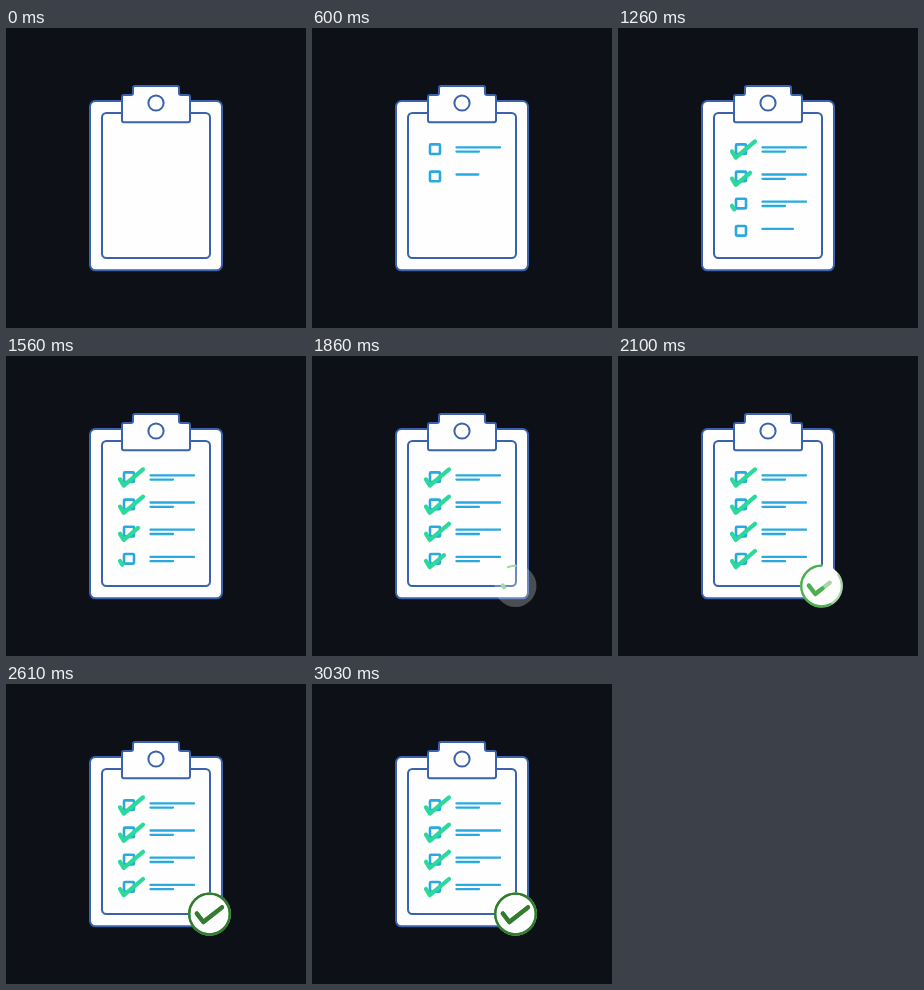
These frames come from a looping animation (300 by 300 pixels, 3060 ms). An HTML page:

```html
<!DOCTYPE html>
<html lang="en">
<head>
<meta charset="utf-8">
<title>Checklist</title>
<style>
  html, body { margin: 0; width: 100%; height: 100%; overflow: hidden; background: #0d1117; }
  svg { display: block; width: 100%; height: 100%; }
</style>
</head>
<body>
<svg viewBox="0 0 300 300">
  <g fill="#fefefe" stroke="#3a62ad" stroke-width="2" stroke-linejoin="round">
    <rect x="84" y="73" width="132" height="169.3" rx="5.5"/>
    <rect x="96" y="85" width="108" height="145" rx="4.5"/>
    <path d="M118 67h7q2 0 2-2v-5q0-2 2-2h42q2 0 2 2v5q0 2 2 2h7q2 0 2 2v23.300q0 2-2 2h-64q-2 0-2-2v-23.300q0-2 2-2z"/>
    <circle cx="150" cy="75" r="7.600"/>
  </g>
  <g id="rows" fill="none" stroke-linecap="round" stroke-linejoin="round"></g>
  <g id="badge" fill="none" stroke-linecap="round" stroke-linejoin="round">
    <circle cx="203.500" cy="230" r="21" fill="#fefefe"/>
  </g>
</svg>
<script>
const LOOP = 3060, FRAME = 30, ROW_GAP = 27.2, ROW_DELAY = 300;
const rows = document.getElementById('rows');
const badge = document.getElementById('badge');
const strokes = [];

const clamp = x => Math.min(1, Math.max(0, x));
const linear = x => x;
const smooth = x => x * x * (3 - 2 * x);

// A path that is traced from its first point between two times.
function trace(parent, d, color, width, start, length, ease = linear) {
  const el = document.createElementNS('http://www.w3.org/2000/svg', 'path');
  const attrs = { d, stroke: color, 'stroke-width': width, pathLength: 1 };
  for (const name in attrs) el.setAttribute(name, attrs[name]);
  parent.append(el);
  strokes.push({ el, start, length, ease });
}

for (let i = 0; i < 4; i++) {
  const y = 121.2 + i * ROW_GAP, t = i * ROW_DELAY;
  trace(rows, `M119 ${y - 4.8}h8q1 0 1 1v7.600q0 1-1 1h-8q-1 0-1-1v-7.600q0-1 1-1z`, '#29a9e0', 2.6, t, 150);
  trace(rows, `M144.500 ${y - 1.9}H188`, '#29a9e0', 2.3, t + 150, 300);
  trace(rows, `M144.500 ${y + 2.4}H167`, '#29a9e0', 2.3, t + 450, 150);
  trace(rows, `M114 ${y + 2.2}L117.800 ${y + 8.4}L137 ${y - 7.8}`, '#2bd99a', 4.2, t + 600, 450);
}

const layers = [['#a5d6a7', 1800], ['#4caf50', 1880], ['#347a2f', 2170]];
for (const [color, start] of layers) {
  trace(badge, 'M203.500 209.700a20.300 20.300 0 0 0 0 40.600a20.300 20.300 0 0 0 0-40.600', color, 2.2, start, 400, smooth);
  trace(badge, 'M190.800 229.500L197.300 238L216 223.300', color, 4.2, start, 400, smooth);
}

function draw(now) {
  const t = Math.floor((now % LOOP) / FRAME) * FRAME;
  for (const { el, start, length, ease } of strokes) {
    const p = ease(clamp((t - start) / length));
    el.style.visibility = p > 0 ? 'visible' : 'hidden';
    el.style.strokeDasharray = p < 1 ? `${p} 2` : 'none';
  }
  badge.firstElementChild.style.opacity = clamp((t - 1800) / 240);
  requestAnimationFrame(draw);
}
draw(performance.now());
</script>
</body>
</html>
```
